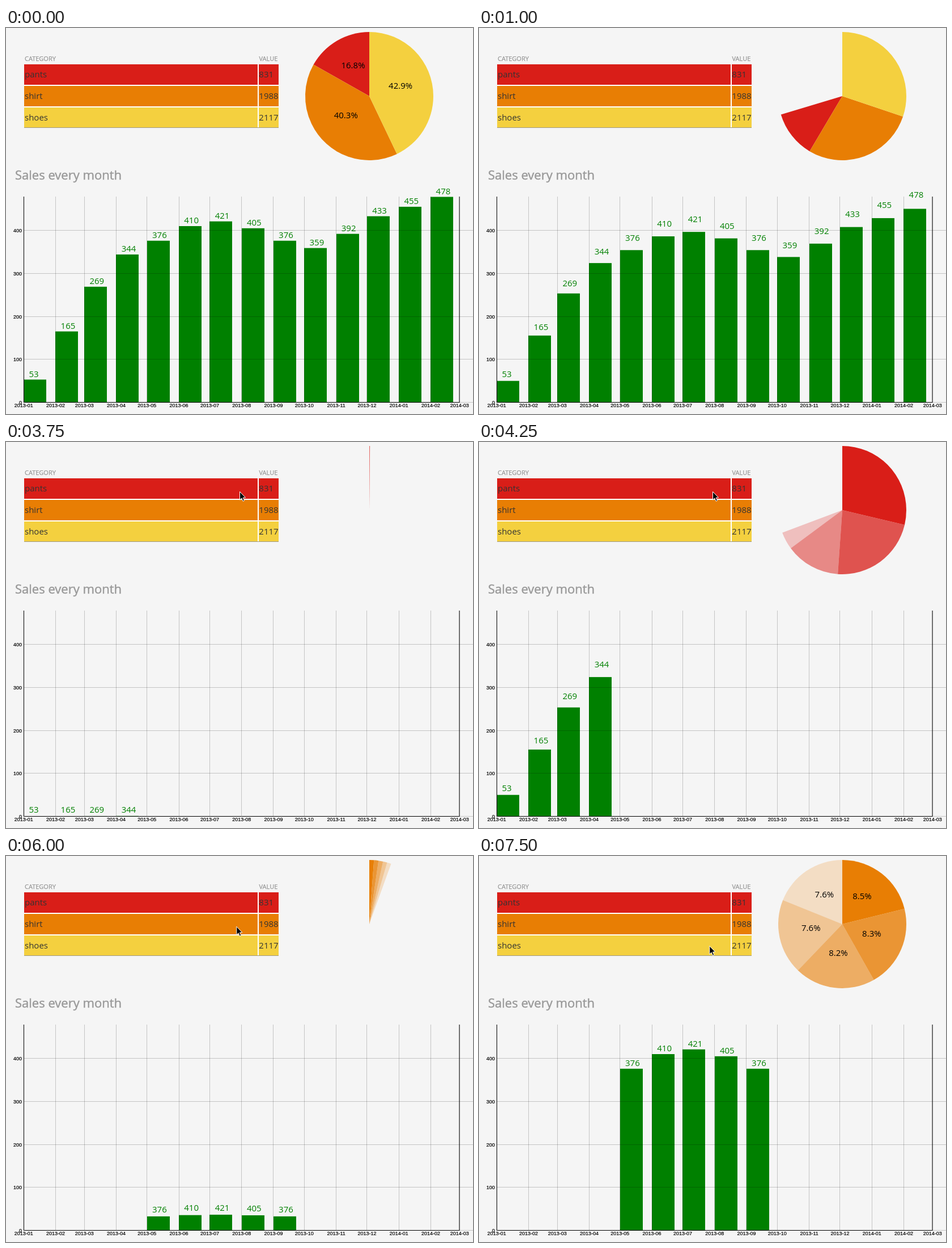
Animation, 824 px wide and 680 px high, one loop 8000 ms. Source, as an HTML page with a canvas:

```html
<!DOCTYPE html>
<html lang="en">
<head>
<meta charset="utf-8">
<title>Sales dashboard</title>
<style>
html, body { margin: 0; width: 100%; height: 100%; overflow: hidden; background: #f5f5f5; }
canvas { display: block; }
</style>
</head>
<body>
<canvas id="stage" width="824" height="680"></canvas>
<script>
const ctx = document.getElementById('stage').getContext('2d');
const LOOP = 8000, STEP = 250;
const RED = '#d91e18', ORANGE = '#e87e04', YELLOW = '#f4d03f', GREEN = '#008000';
const SANS = '"Open Sans", sans-serif', AXIS = '"Liberation Sans", Arial, sans-serif';

const sales = [53, 165, 269, 344, 376, 410, 421, 405, 376, 359, 392, 433, 455, 478];
const total = 4936;
const categories = [['pants', 831, RED], ['shirt', 1988, ORANGE], ['shoes', 2117, YELLOW]];

// Chart geometry
const X0 = 31.2, X1 = 800.2, TOP = 297.5, BASE = 659.5;
const day = m => (Date.UTC(2013, m, 1) - Date.UTC(2013, 0, 1)) / 864e5;
const monthX = m => X0 + (X1 - X0) * day(m) / day(14);
const valueY = v => BASE - (BASE - TOP) * v / 478;
const crisp = v => Math.floor(v) + 0.5;

// A view is a range of months plus the slices of the pie
const shades = (color, values) =>
  values.map((value, i) => ({ value, color, alpha: 1 - i / values.length }));
const overview = categories.slice().reverse()
  .map(([, value, color]) => ({ value, color, alpha: 1 }));
const views = [
  { pie: 420, bars: 433, labels: 458, from: 0, to: 14, slices: overview },
  { pie: 3675, bars: 3683, labels: 3690, from: 0, to: 4, slices: shades(RED, [344, 269, 165, 53]) },
  { pie: 5760, bars: 5791, labels: 5816, from: 4, to: 9, slices: shades(ORANGE, [421, 410, 405, 376, 376]) }
];
const idle = { ...views[0], pie: -2000, bars: -2000, labels: -2000 };

// Pointer stops: time, x, y
const stops = [
  [3000, 604.5, 108.5], [3250, 438.5, 88], [3500, 412.5, 87.5], [5250, 409.5, 107.5],
  [5500, 406.8, 124.3], [7250, 406.8, 125], [7500, 406.8, 158.5]
];

function ease(t, start, length) {
  const p = Math.min(1, Math.max(0, (t - start) / length));
  return p < 0.5 ? 4 * p ** 3 : 1 - 4 * (1 - p) ** 3;
}

function text(str, x, y, size, color, align = 'left', family = SANS, weight = 0) {
  ctx.font = `${size}px ${family}`;
  ctx.textAlign = align;
  ctx.fillStyle = color;
  ctx.fillText(str, x, y);
  if (weight) {
    ctx.strokeStyle = color;
    ctx.lineWidth = weight;
    ctx.strokeText(str, x, y);
  }
}

function rect(x, y, w, h, color) {
  ctx.fillStyle = color;
  ctx.fillRect(x, y, w, h);
}

function line(x1, y1, x2, y2, color) {
  ctx.strokeStyle = color;
  ctx.lineWidth = 1;
  ctx.beginPath();
  ctx.moveTo(x1, y1);
  ctx.lineTo(x2, y2);
  ctx.stroke();
}

function drawTable() {
  text('CATEGORY', 33, 58, 11, '#999', 'left', SANS, 0.25);
  text('VALUE', 446.5, 58, 11, '#999', 'left', SANS, 0.25);
  rect(32, 64, 449, 112, '#fff');
  categories.forEach(([name, value, color], i) => {
    const y = 64 + 38 * i;
    rect(32, y, 412, 36, color);
    rect(446, y, 35, 36, color);
    text(name, 33, y + 23, 15, '#333');
    text(value, 446.3, y + 23, 15, '#333');
  });
  line(32, 175.5, 481, 175.5, '#a09a80');
}

function drawPie(t, view) {
  const cx = 641, cy = 120, r = 113;
  const grown = ease(t, view.pie, 1000);
  const done = t >= view.pie + 1000;
  const sum = view.slices.reduce((s, p) => s + p.value, 0);
  const turn = 2 * Math.PI * grown / sum;
  let end = sum;
  // The last slice lies lowest, so earlier slices may cover its label
  for (const { value, color, alpha } of view.slices.slice().reverse()) {
    const a1 = end * turn - Math.PI / 2;
    end -= value;
    const a0 = end * turn - Math.PI / 2;
    ctx.globalAlpha = alpha;
    ctx.fillStyle = color;
    ctx.beginPath();
    ctx.moveTo(cx, cy);
    ctx.arc(cx, cy, r, a0, a1);
    ctx.fill();
    ctx.globalAlpha = 1;
    if (done) {
      const mid = (a0 + a1) / 2;
      text((100 * value / total).toFixed(1) + '%',
        cx + Math.cos(mid) * r / 2, cy + Math.sin(mid) * r / 2, 15, '#000', 'center');
    }
  }
}

function drawChart(t, view) {
  const grown = ease(t, view.bars, 750);
  const raised = ease(t, view.labels, 650);
  const grid = 'rgba(0,0,0,0.2)';

  for (let m = view.from; m < view.to; m++) {
    const h = (BASE - valueY(sales[m])) * grown;
    rect(Math.round(monthX(m)), BASE - h, 40, h, GREEN);
  }
  for (let v = 0; v <= 400; v += 100) {
    const y = crisp(valueY(v));
    line(32, y, 824, y, grid);
    text(v, 28, y + 3.2, 9, '#000', 'right', AXIS, 0.2);
  }
  for (let m = 0; m <= 14; m++) {
    const x = crisp(monthX(m));
    line(x, 297, x, 659, grid);
    const label = `${2013 + Math.floor(m / 12)}-${String(m % 12 + 1).padStart(2, '0')}`;
    text(label, monthX(m), 668.3, 9, '#000', 'center', AXIS, 0.2);
  }
  line(31.5, 297, 31.5, 660, '#000');
  line(crisp(X1) - 0.5, 297, crisp(X1) - 0.5, 660, '#000');
  line(31, 659.5, 800, 659.5, '#000');

  for (let m = view.from; m < view.to; m++) {
    const y = 653.5 + (valueY(sales[m]) - 4.7 - 653.5) * raised;
    text(sales[m], monthX(m) + 9.2, y, 15, GREEN);
  }
}

function drawPointer(t) {
  const stop = stops.filter(s => s[0] <= t).pop();
  if (!stop) return;
  ctx.save();
  ctx.translate(stop[1], stop[2]);
  ctx.beginPath();
  for (const [x, y] of [[0, 0], [0, 14.5], [3.3, 11.4], [5.6, 16.8], [8, 15.7], [5.7, 10.6], [10, 10.4]])
    ctx.lineTo(x, y);
  ctx.closePath();
  ctx.fillStyle = '#000';
  ctx.fill();
  ctx.strokeStyle = '#fff';
  ctx.lineWidth = 1;
  ctx.stroke();
  ctx.restore();
}

function draw(t) {
  const view = views.filter(v => t >= v.pie).pop() || idle;
  rect(0, 0, 824, 680, '#f5f5f5');
  drawTable();
  drawPie(t, view);
  text('Sales every month', 16, 267, 22, '#999', 'left', SANS, 0.45);
  drawChart(t, view);
  drawPointer(t);
}

// The picture advances four times a second
const begin = performance.now();
function tick() {
  const t = (performance.now() - begin + 8) % LOOP;
  draw(Math.floor(t / STEP) * STEP);
  requestAnimationFrame(tick);
}
tick();
</script>
</body>
</html>
```
